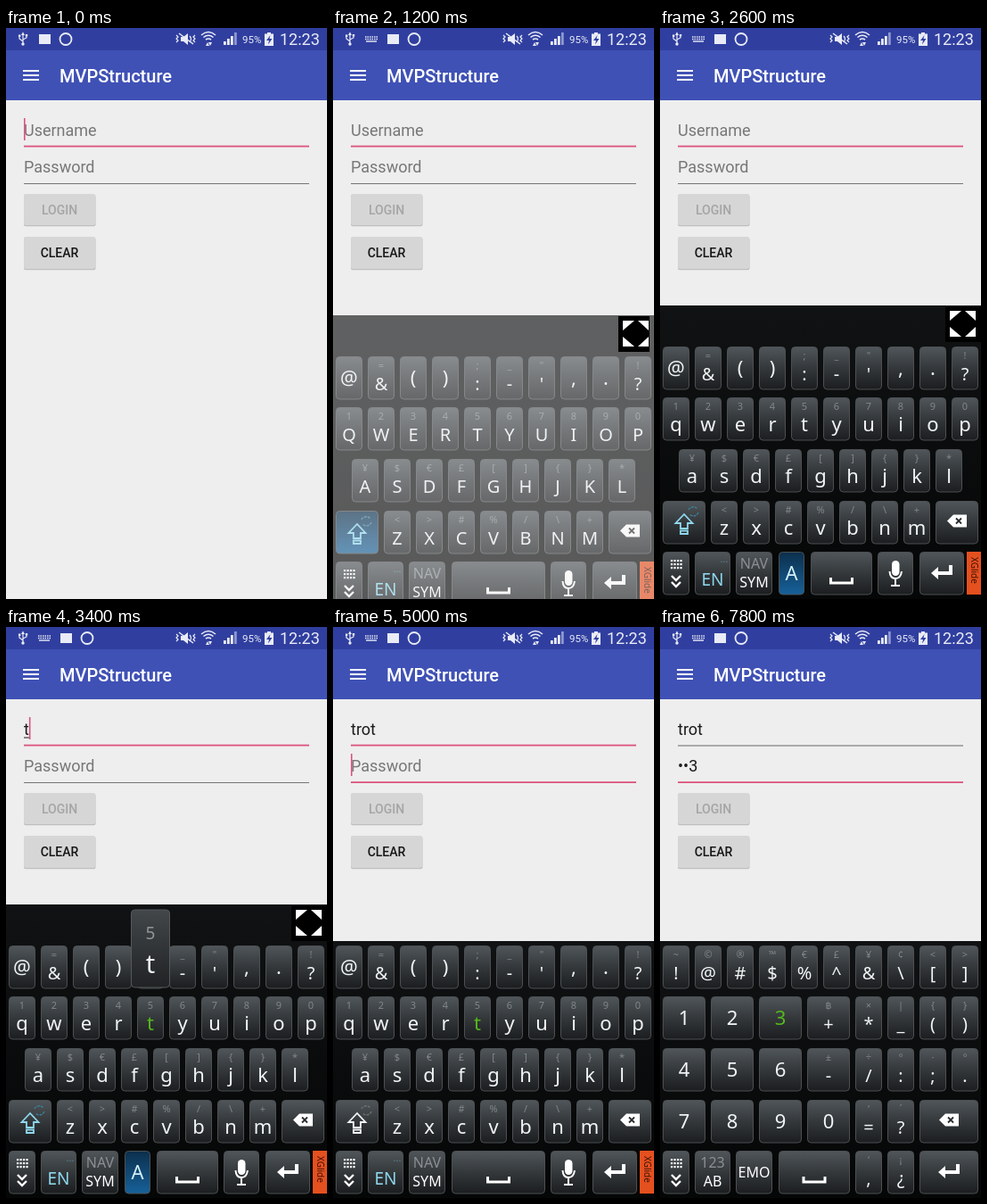
Write an HTML page that moves like this. It is 360 px wide and 640 px high and loops after 8 s.

```html
<!DOCTYPE html>
<html lang="en">
<head>
<meta charset="utf-8">
<title>Login form</title>
<style>
  html, body { margin: 0; width: 100%; height: 100%; overflow: hidden; background: #eee; }
  svg { display: block; width: 360px; height: 640px; font-family: Roboto, sans-serif; }
  .kb { font-family: "Noto Sans", "Open Sans", sans-serif; text-anchor: middle; }
</style>
</head>
<body>
<svg viewBox="0 0 360 640">
  <defs>
    <linearGradient id="key" x2="0" y2="1">
      <stop stop-color="#50565a"/><stop offset=".5" stop-color="#34383b"/><stop offset="1" stop-color="#1b1d1f"/>
    </linearGradient>
    <linearGradient id="blue" x2="0" y2="1">
      <stop stop-color="#0c2f4c"/><stop offset="1" stop-color="#17619a"/>
    </linearGradient>
    <linearGradient id="pop" x2="0" y2="1">
      <stop stop-color="#43474a"/><stop offset="1" stop-color="#202224"/>
    </linearGradient>
    <linearGradient id="board" x2="0" y2="1">
      <stop stop-color="#101213"/><stop offset="1" stop-color="#050606"/>
    </linearGradient>
  </defs>
  <g id="form"></g>
  <g id="board-layer" class="kb"></g>
</svg>
<script>
const LOOP = 8000, STEP = 200;
const ROW_Y = [357, 414, 472, 530, 587];
const PINK = '#dc547e', CYAN = '#8ed8ee', GREEN = '#55b81c', HINT = '#83878a';
const USER = 'trot', PIN = '123';
const BOARD_IN = 1200, LOWERCASE = 2600, TO_PASSWORD = 5000, TO_SYMBOLS = 6600;

// time and label of each key press
const PRESSES = [
  [3400, 't'], [3800, 'r'], [4200, 'o'], [4600, 't'],
  [6200, 'SYM'], [6800, '1'], [7000, '2'], [7400, '3']
];
const BLINK_STARTS = [-350, 3300, 3700, 4100, 4500, 5000, 6700, 6950, 7250];

const form = document.getElementById('form');
const boardLayer = document.getElementById('board-layer');
const ruler = document.createElement('canvas').getContext('2d');

const esc = s => s.replace(/&/g, '&amp;').replace(/</g, '&lt;');
const text = (x, y, s, size, fill, more = '') =>
  `<text x="${x}" y="${y}" font-size="${size}" fill="${fill}" ${more}>${esc(s)}</text>`;
const rect = (x, y, w, h, fill, more = '') =>
  `<rect x="${x}" y="${y}" width="${w}" height="${h}" fill="${fill}" ${more}/>`;
const path = (d, fill, more = '') => `<path d="${d}" fill="${fill}" ${more}/>`;
const line = (d, color, width = 1, more = '') =>
  path(d, 'none', `stroke="${color}" stroke-width="${width}" ${more}`);

function textWidth(s) {
  ruler.font = '18px Roboto, sans-serif';
  return ruler.measureText(s).width;
}

function statusBar(t) {
  const c = '#e9ebf6', open = t >= BOARD_IN, shift = open ? 24 : 0;
  let s = rect(0, 0, 360, 25, '#303f9f');
  s += line('M19 6V18M19 15L15 12V9M19 13L23 11V8', c, 1.2);
  s += path('M17 8L19 4.5L21 8Z', c) + `<circle cx="19" cy="18" r="1.7" fill="${c}"/>`;
  s += rect(14, 7.5, 2.4, 2.4, c) + rect(21.8, 7, 2.4, 2.4, c);
  if (open) {
    s += line('M36 10H50M36 12.5H50', c, 1.4, 'stroke-dasharray="1.5 1"');
    s += line('M37 15H49', c, 1.4);
  }
  s += rect(37 + shift, 7, 13, 11, c);
  s += `<circle cx="${67 + shift}" cy="12.5" r="6.5" fill="none" stroke="${c}" stroke-width="1.8"/>`;
  // muted speaker with vibration marks
  s += path('M196 10H199L204 6V19L199 15H196Z', c);
  s += line('M194 6L210 18', c, 1.5);
  s += line('M191 8l2 2l-2 2l2 2l-2 2M212 8l-2 2l2 2l-2 2l2 2M206 9q3 3 0 7', c, 1.2);
  // wireless arcs and transfer arrows
  s += line('M219 8Q227 1 235 8M221.5 10.5Q227 6 232.5 10.5M224 13Q227 11 230 13', c, 1.6);
  s += path('M224 20l2-4l2 4ZM227 16h4l-2 4Z', c);
  [4, 7, 10, 14].forEach((h, i) => s += rect(244 + i * 4, 19 - h, 2.8, h, i < 3 ? c : '#8d97cf'));
  s += text(265, 17, '95%', 11.5, c);
  s += path('M293 5h4v1.5h3v13.5h-10v-13.5h3Z', c);
  s += path('M296.5 8L292 14H295L294 18.5L298.5 12H295.5Z', '#303f9f');
  return s + text(307, 19, '12:23', 18, c);
}

function underline(y, color) {
  const thick = color === PINK;
  return rect(20, y - (thick ? .8 : 0), 320, thick ? 1.8 : 1, color);
}

function button(y, h, label, color) {
  return rect(20, y + .7, 80.5, h + .6, '#bfbfbf', 'rx="2"') + rect(20, y, 80, h, '#d6d6d6', 'rx="2"') +
    text(60, y + 23, label, 14, color, 'font-weight="500" text-anchor="middle"');
}

function drawForm(t) {
  const count = (from, to) => PRESSES.filter(p => p[0] >= from && p[0] < to && p[0] <= t).length;
  const user = USER.slice(0, count(0, TO_PASSWORD));
  const typed = count(TO_SYMBOLS, LOOP);
  const pin = typed ? '•'.repeat(typed - 1) + PIN[typed - 1] : '';
  const inPin = t >= TO_PASSWORD;
  const value = (y, s, label) => text(20, y, s || label, 18, s ? '#1c1c1c' : '#777');

  let s = rect(0, 0, 360, 640, '#eee') + rect(0, 25, 360, 56, '#3f51b5') + statusBar(t);
  for (const y of [47, 52, 57]) s += rect(19, y, 18, 2, '#fff');
  s += text(60, 61, 'MVPStructure', 20, '#fff', 'font-weight="500"');
  s += value(121, user, 'Username') + value(162, pin, 'Password');
  if (user && !inPin) s += rect(20, 123.5, textWidth(user), 1, '#1c1c1c');
  s += underline(132.5, t < TO_PASSWORD + STEP ? PINK : '#686868');
  s += underline(174, inPin ? PINK : '#757575');
  s += button(186, 35, 'LOGIN', '#a5a5a5') + button(234, 36, 'CLEAR', '#151515');

  const start = BLINK_STARTS.filter(b => b <= t).pop();
  if (Math.floor((t - start) / 500) % 2 === 0) {
    s += rect(20 + textWidth(inPin ? pin : user), inPin ? 142 : 101, 1.6, 25, PINK);
  }
  form.innerHTML = s;
}

function drawBoard(t) {
  if (t < BOARD_IN) { boardLayer.innerHTML = ''; return; }
  const sliding = t < BOARD_IN + STEP;
  const symbols = t >= TO_SYMBOLS, pinMode = t >= TO_PASSWORD;
  const upper = t < LOWERCASE, predict = !upper && !pinMode;
  const [pressTime, pressed] = PRESSES.filter(p => p[0] <= t).pop() || [-LOOP, ''];
  const lit = t - pressTime < 600 ? pressed : '';
  const popping = t - pressTime < 400 && pressed !== 'SYM';
  const top = pinMode ? 352 : 311;
  let popup = '';

  const face = (x, r, w, fill = 'url(#key)') =>
    rect(x + .5, ROW_Y[r] + .5, w - 1, 47.5, fill, 'rx="4" stroke="#4c5053"');

  function key(x, r, w, label, hint = ' ') {
    const y = ROW_Y[r], cx = x + w / 2, letter = label >= 'a' && label <= 'z';
    const shown = upper ? label.toUpperCase() : label;
    const bare = hint === ' ';
    const size = bare || (letter && !upper) ? 22 : 20;
    let s = face(x, r, w);
    if (!bare) s += text(cx, y + 14, hint, 11, HINT);
    s += text(cx, y + (bare ? 32 : 38), shown, size, label === lit ? GREEN : '#f2f4f5');
    if (label === lit && popping) {
      const pw = Math.max(43, w), px = cx - pw / 2;
      popup = rect(px, y - 97, pw, 87, 'url(#pop)', 'rx="4" stroke="#55595c"') +
        (bare ? '' : text(cx, y - 64, hint, 19, '#909497')) +
        text(cx, y - 26, shown, 29, '#f2f4f5');
    }
    return s;
  }

  const row = (x, r, w, labels, hints = '') =>
    [...labels].map((c, i) => key(x + i * (w + 6), r, w, c, [...hints][i])).join('');

  const backspace = (x, w) => {
    const c = x + w / 2;
    return face(x, 3, w) + path(`M${c - 11} 552.5l7-7h15v14h-15Z`, '#fff') +
      line(`M${c - 1} 549.5l6 6m0-6l-6 6`, '#292c2e', 1.8);
  };
  const enter = (x, w) => {
    const c = x + w / 2;
    return face(x, 4, w) + path(`M${c - 12} 611l8-7v5h12v-7h4v11h-16v5Z`, '#fff');
  };
  const space = (x, w) => {
    const c = x + w / 2;
    return face(x, 4, w) + line(`M${c - 12} 616v6h24v-6`, '#fff', 3);
  };
  const hideKey = () => {
    let s = face(3, 4, 30);
    for (let i = 0; i < 12; i++) s += rect(12 + i % 4 * 3.5, 596 + Math.floor(i / 4) * 4, 2.2, 2.2, '#fff');
    return s + line('M13 614l5 5l5-5M13 621l5 5l5-5', '#fff', 2.4);
  };
  const modeKey = (x, w, a, b, color = '#fff') =>
    face(x, 4, w) + text(x + w / 2, 606, a, 16, '#8b8f92') + text(x + w / 2, 627, b, 16, color);

  function shiftKey() {
    return face(3, 3, 48, upper ? 'url(#blue)' : undefined) +
      line('M27 545L17.5 555H23V561H31V555H36.5ZM23 563.5H31V567H23Z', pinMode ? '#f2f4f5' : CYAN, 1.8) +
      line('M32 540a6 6 0 0 1 10-1M43 543a6 6 0 0 1-10 2', pinMode ? '#6c7073' : '#3e7f96', 1.4,
        'stroke-dasharray="3 1"');
  }

  function micKey() {
    return face(244, 4, 40) + rect(260, 597, 8.5, 17, '#fff', 'rx="4.2"') +
      line('M257.5 609Q258 617 264 617T271 609M264 617V624M259 625H269', '#fff', 2);
  }

  function letters() {
    let s = row(3, 0, 30, '@&()' + ":-',.?", ' =  ;_"  !');
    s += row(3, 1, 30, 'qwertyuiop', '1234567890');
    s += row(21, 2, 30, 'asdfghjkl', '¥$€£[]{}*');
    s += shiftKey() + row(57, 3, 30, 'zxcvbnm', '<>#%/\\+') + backspace(309, 48);
    s += hideKey() + face(39, 4, 40) + text(59, 625, 'EN', 19, CYAN) + text(72, 599, '...', 11, '#5b8798');
    s += modeKey(85, 41, 'NAV', 'SYM', lit === 'SYM' ? GREEN : '#fff');
    if (predict) s += face(133, 4, 29, 'url(#blue)') + text(147.5, 619, 'A', 22, '#d5f2fb') + space(169, 69);
    else s += space(133, 105);
    s += micKey() + enter(291, 50) + rect(344, 587, 16, 48, '#e5501f');
    return s + '<g transform="translate(349 593) rotate(90)">' +
      text(0, 0, 'XGlide', 10, '#3b1206', 'text-anchor="start"') + '</g>';
  }

  function symbolKeys() {
    let s = row(3, 0, 30, '!@#$%^&\\[]', '~©®™€£¥¢<>');
    s += row(3, 1, 48, '123') + key(165, 1, 48, '+', '฿') + row(219, 1, 30, '*_()', '×|{}');
    s += row(3, 2, 48, '456') + key(165, 2, 48, '-', '±') + row(219, 2, 30, '/:;.', '÷°·°');
    s += row(3, 3, 48, '7890') + row(219, 3, 30, '=?', '‘´') + backspace(291, 66);
    s += hideKey() + modeKey(39, 40, '123', 'AB');
    s += face(85, 4, 41) + text(105.5, 617, 'EMO', 16, '#fff');
    return s + space(133, 80) + row(219, 4, 30, ',¿', '‘¡') + enter(291, 66);
  }

  let s = rect(0, top, 360, 640 - top, 'url(#board)');
  s += symbols ? symbolKeys() : letters();
  s = `<g opacity="${sliding ? .64 : 1}">${s}</g>`;
  if (!pinMode) {
    s += rect(320, 312, sliding ? 35 : 40, 40, '#000');
    s += path('M325 317h13l-13 11ZM354 317h-12l12 11ZM325 346h13l-13-11ZM354 346h-12l12-11Z', '#fff');
  }
  boardLayer.setAttribute('transform', `translate(0 ${sliding ? 11 : 0})`);
  boardLayer.innerHTML = s + popup;
}

let shownStep = -1;
function tick() {
  const t = Math.floor(performance.now() % LOOP / STEP) * STEP;
  if (t !== shownStep) {
    shownStep = t;
    drawForm(t);
    drawBoard(t);
  }
  requestAnimationFrame(tick);
}
tick();
</script>
</body>
</html>
```
